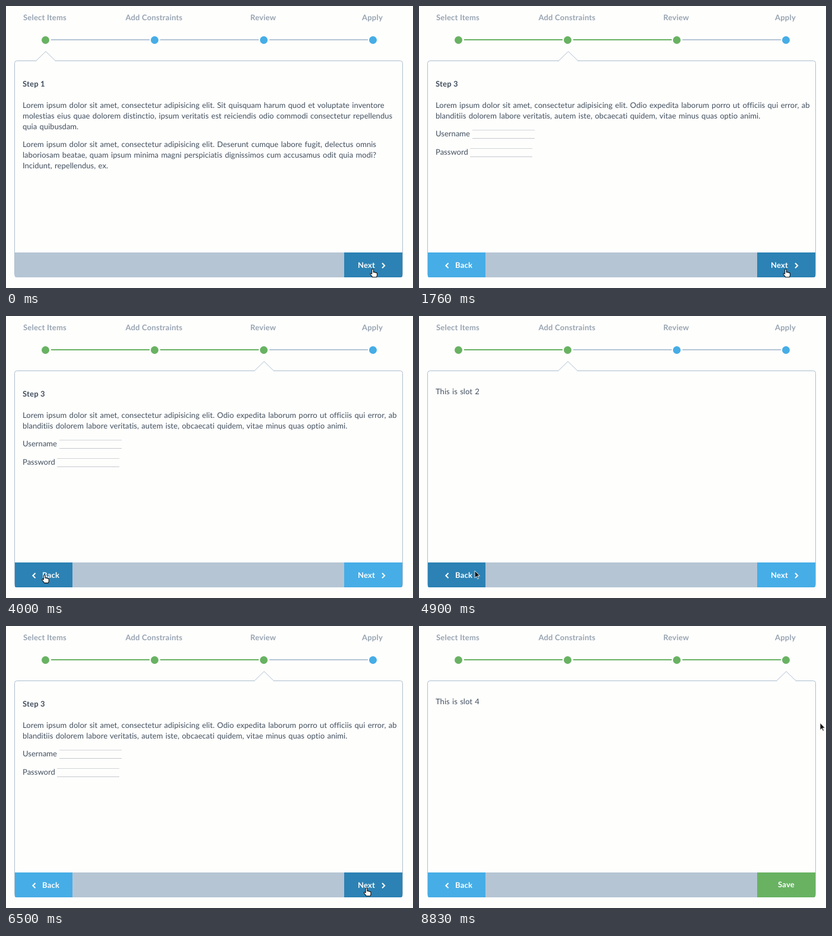
These frames come from a looping animation (686x476 px, 9100 ms). An HTML page:

```html
<!DOCTYPE html>
<html lang="en">
<head>
<meta charset="utf-8">
<title>Step wizard</title>
<style>
  html, body { margin: 0; width: 100%; height: 100%; overflow: hidden; background: #fefefd; }
  svg { display: block; width: 686px; height: 476px; }
  text {
    font: 400 13px Lato, "Open Sans", sans-serif;
    letter-spacing: .03px; word-spacing: 1px;
    text-rendering: geometricPrecision; fill: #414e5d; white-space: pre;
  }
  .bold { font-weight: 700; letter-spacing: .2px; word-spacing: 0; }
  .label { fill: #98a4b1; text-anchor: middle; }
  .button { fill: #fff; }
  .mid { text-anchor: middle; }
  .chevron { fill: none; stroke: #fff; stroke-width: 2; }
</style>
</head>
<body>
<svg viewBox="0 0 686 476" xmlns="http://www.w3.org/2000/svg">
  <defs><clipPath id="inside"><rect x="14" y="92" width="654.5" height="366" rx="4"/></clipPath></defs>
  <g id="track"></g>
  <rect x="14.5" y="92.5" width="654" height="365" rx="4" fill="none" stroke="#adbfce"/>
  <g clip-path="url(#inside)">
    <rect x="15" y="416" width="653" height="42" fill="#b5c5d4"/>
    <g id="back">
      <rect id="backBg" x="15" y="416" width="97" height="42"/>
      <path class="chevron" d="M49.5 434l-4.2 4.2l4.2 4.2"/>
      <text class="bold button" x="61" y="442">Back</text>
    </g>
    <rect id="nextBg" x="570" y="416" width="98" height="42"/>
    <g id="next">
      <text class="bold button" x="593" y="442">Next</text>
      <path class="chevron" d="M634 434l4.2 4.2l-4.2 4.2"/>
    </g>
    <text id="save" class="bold button mid" x="619" y="441">Save</text>
  </g>
  <path id="caret" d="M-17 93.2L0 76.7L17 93.2" fill="#fefefd" stroke="#adbfce"/>
  <g id="pages"></g>
  <path id="hand" fill="#fff" stroke="#111" stroke-linejoin="round"
    d="M-1.2 7.5V1.2a1.2 1.2 0 0 1 2.4 0V5c.5-.6 1.9-.5 2.1.4.6-.5 1.8-.2 1.9.6.7-.4 1.6 0 1.6.9V9.5c0 1.2-.6 1.8-.8 3H-.3C-1 11-2.6 9.6-3.6 7.9c-.5-1 .8-1.7 1.5-.9z"/>
  <path id="arrow" fill="#111" stroke="#fff" stroke-width=".8"
    d="M0 0V11L2.6 8.6L4.3 12.6L6 11.9L4.3 8H7.8Z"/>
</svg>
<script>
const LOOP = 9100, GAP = 184, LEADING = 18;
const GREEN = '#68b262', BLUE = '#46ade6', DARK = '#2c82b4', LINE = '#b5c5d4';

const STEPS = [
  { at: 0, step: 0 },
  { at: 630, step: 1 },
  { at: 1760, step: 2 },
  { at: 4300, step: 1 },
  { at: 6160, step: 2 },
  { at: 6900, step: 3 }
];

// pointer moves; each starts where the one before ended
const MOVES = [
  { from: 0, to: 1, x: 618, y: 444 },
  { from: 3000, to: 3400, x: 215, y: 463 },
  { from: 3400, to: 3900, x: 47, y: 441 },
  { from: 3930, to: 4100, x: 94, y: 430 },
  { from: 4900, to: 5560, x: 607.5, y: 442 },
  { from: 8700, to: 8830, x: 676, y: 163.5 }
];

const PAGES = [
  {
    title: 'Step 1',
    text: [
      'Lorem ipsum dolor sit amet, consectetur adipisicing elit. Sit quisquam harum quod et voluptate inventore\n' +
      'molestias eius quae dolorem distinctio, ipsum veritatis est reiciendis odio commodi consectetur repellendus\n' +
      'quia quibusdam.',
      'Lorem ipsum dolor sit amet, consectetur adipisicing elit. Deserunt cumque labore fugit, delectus omnis\n' +
      'laboriosam beatae, quam ipsum minima magni perspiciatis dignissimos cum accusamus odit quia modi?\n' +
      'Incidunt, repellendus, ex.'
    ]
  },
  { text: ['This is slot 2'] },
  {
    title: 'Step 3',
    text: [
      'Lorem ipsum dolor sit amet, consectetur adipisicing elit. Odio expedita laborum porro ut officiis qui error, ab\n' +
      'blanditiis dolorem labore veritatis, autem iste, obcaecati quidem, vitae minus quas optio animi.',
      'Username',
      'Password'
    ]
  },
  { text: ['This is slot 4'] }
];

const $ = id => document.getElementById(id);

function add(parent, tag, attrs, text) {
  const el = document.createElementNS('http://www.w3.org/2000/svg', tag);
  for (const key in attrs) el.setAttribute(key, attrs[key]);
  if (text) el.textContent = text;
  return parent.appendChild(el);
}

const write = (parent, x, y, text, cls = '') => add(parent, 'text', { x, y, class: cls }, text);
const dotX = i => 66.5 + GAP * i;

const links = [], dots = [];
['Select Items', 'Add Constraints', 'Review', 'Apply'].forEach((name, i) => {
  const x = dotX(i);
  write($('track'), x - 1, 24, name, 'bold label');
  if (i) links.push(add($('track'), 'rect', { x: x - GAP + 9.5, y: 56, width: GAP - 18, height: 2 }));
  dots.push(add($('track'), 'circle', { cx: x, cy: 57.5, r: 6.5 }));
});

function buildPage({ title, text }) {
  const page = add($('pages'), 'g', {});
  if (title) write(page, 28, 136, title, 'bold');
  let y = title ? 172 : 132;
  for (const paragraph of text) {
    for (const line of paragraph.split('\n')) {
      write(page, 28, y, line);
      y += LEADING;
    }
    y += 12.4;
  }
  return page;
}

function addInput(page, x, y) {
  add(page, 'path', { d: `M${x} ${y + .5}h105`, stroke: '#d3d4d6' });
  add(page, 'path', { d: `M${x} ${y + 14.5}h105`, stroke: '#c6c8ca' });
}

const pages = PAGES.map(buildPage);
addInput(pages[2], 90, 209);
addInput(pages[2], 86, 240);

const clamp = p => Math.min(1, Math.max(0, p));
const smooth = p => p * p * (3 - 2 * p);
const easeOut = p => smooth(p ** .58);
const lastIndex = (list, test) => list.filter(test).length - 1;

function pointer(t) {
  const i = lastIndex(MOVES, m => m.from <= t);
  const goal = MOVES[i], start = MOVES[Math.max(0, i - 1)];
  const p = smooth(clamp((t - goal.from) / (goal.to - goal.from)));
  return { x: start.x + (goal.x - start.x) * p, y: start.y + (goal.y - start.y) * p, goal };
}

function buttonAt({ x, y }) {
  if (y < 416 || y > 458) return null;
  return x >= 15 && x < 112 ? 'back' : x >= 570 && x < 668 ? 'next' : null;
}

// a button stays dark until the pointer reaches the other one
function litButton(t) {
  for (let s = t; s > 0; s -= 20) {
    const button = buttonAt(pointer(s));
    if (button) return button;
  }
  return 'next';
}

const show = (el, on) => el.setAttribute('visibility', on ? 'visible' : 'hidden');
const paint = (el, color) => el.setAttribute('fill', color);

function draw(t) {
  const n = lastIndex(STEPS, s => s.at <= t);
  const { at, step } = STEPS[n];
  const before = STEPS[Math.max(0, n - 1)].step;
  const p = easeOut(clamp((t - at) / 320));
  $('caret').setAttribute('transform', `translate(${dotX(before + (step - before) * p) + .5})`);

  dots.forEach((dot, i) => paint(dot, i <= step ? GREEN : BLUE));
  links.forEach((link, i) => paint(link, i < step ? GREEN : LINE));
  pages.forEach((page, i) => show(page, i === step));

  const last = step === 3, lit = litButton(t);
  show($('back'), step > 0);
  show($('next'), !last);
  show($('save'), last);
  paint($('backBg'), lit === 'back' ? DARK : BLUE);
  paint($('nextBg'), last ? GREEN : lit === 'next' ? DARK : BLUE);

  const tip = pointer(t), over = buttonAt(tip);
  const isHand = over !== null && over === buttonAt(tip.goal);
  for (const id of ['hand', 'arrow']) {
    $(id).setAttribute('transform', `translate(${tip.x} ${tip.y}) scale(1.1)`);
    show($(id), isHand === (id === 'hand'));
  }
}

function tick() {
  draw(performance.now() % LOOP);
  requestAnimationFrame(tick);
}
tick();
</script>
</body>
</html>
```
